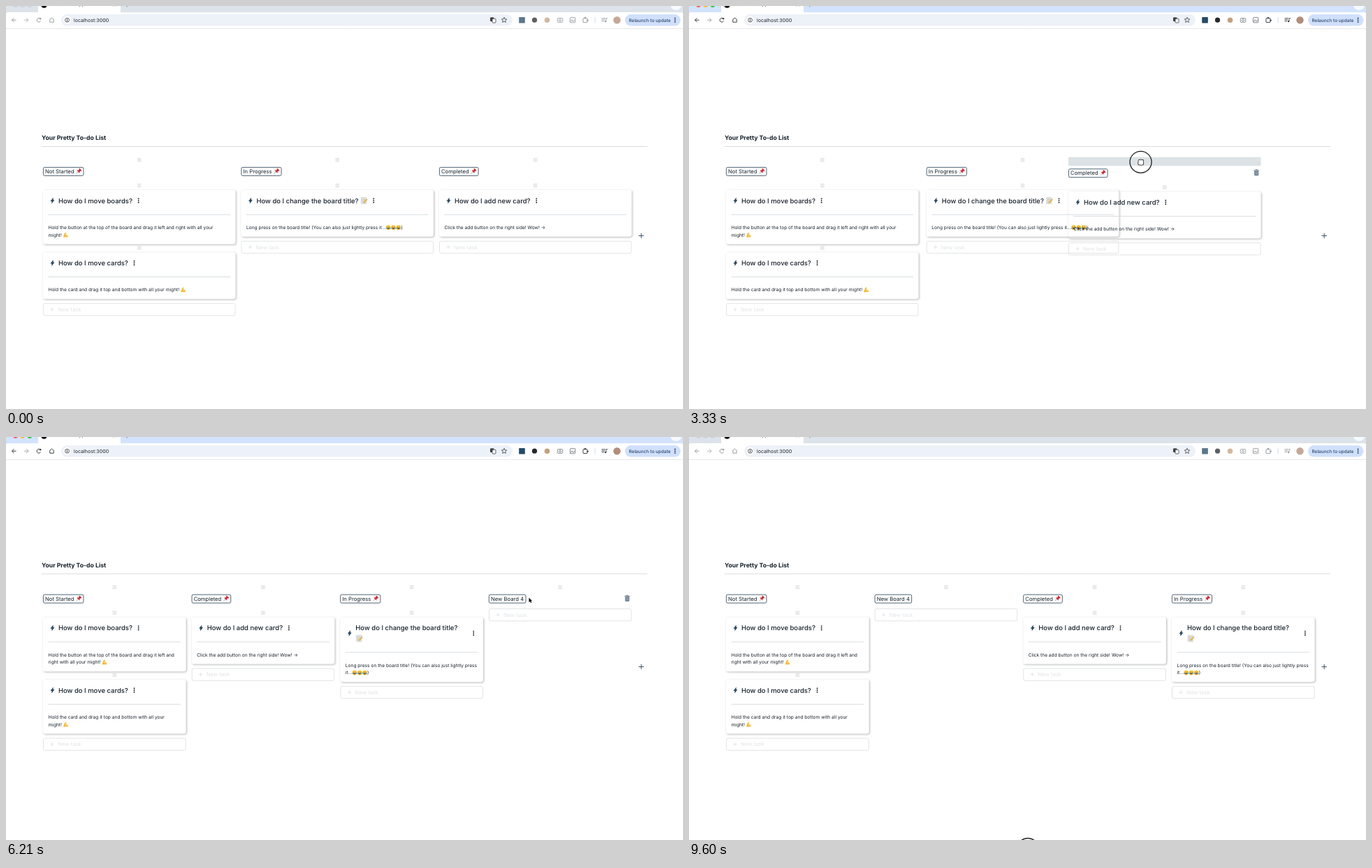
Write an HTML page with a canvas that moves like this. It is 969 px wide and 578 px high and loops after 9630 ms.

```html
<!DOCTYPE html>
<html lang="en">
<head>
<meta charset="utf-8">
<title>To-do boards</title>
<style>
html, body { margin: 0; width: 100%; height: 100%; overflow: hidden; background: #fff }
canvas { display: block; width: 969px; height: 578px }
</style>
</head>
<body>
<canvas id="stage" width="969" height="578"></canvas>
<script>
const g = document.getElementById('stage').getContext('2d');
g.textRendering = 'geometricPrecision';
const LOOP = 9630, INK = '#16212b', SLATE = '#5d7286', RULE = '#d8dde1', FAINT = '#e2e4e6';
const BAR = '#dce2e6', PALE = '#f0fafe';
const clamp = u => Math.min(1, Math.max(0, u));
const mix = (a, b, u) => a + (b - a) * u;
const ramp = (t, start, time) => clamp((t - start) / time);

// cubic-bezier(.4, 0, .1, 1), solved by bisection
function ease(u) {
  let lo = 0, hi = 1;
  for (let i = 0; i < 16; i++) {
    const s = (lo + hi) / 2, r = 1 - s;
    if (1.2 * s * r * r + .3 * s * s * r + s ** 3 < u) lo = s; else hi = s;
  }
  return u >= 1 ? 1 : 3 * lo * lo - 2 * lo ** 3;
}
const glide = (t, start, time = 450) => ease(ramp(t, start, time));

// drawing helpers
function at(x, y, draw, sx = 1, sy = sx) {
  g.save(); g.translate(x, y); g.scale(sx, sy); draw(); g.restore();
}
function paint(fill, stroke, width = 1) {
  if (fill) { g.fillStyle = fill; g.fill(); }
  if (stroke) { g.strokeStyle = stroke; g.lineWidth = width; g.stroke(); }
}
function box(x, y, w, h, r, ...style) {
  g.beginPath(); g.roundRect(x, y, w, h, r); paint(...style);
}
function disc(x, y, r, ...style) {
  g.beginPath(); g.arc(x, y, r, 0, 7); paint(...style);
}
function trace(points, ...style) {
  g.beginPath();
  for (let i = 0; i < points.length; i += 2) g.lineTo(points[i], points[i + 1]);
  paint(...style);
}
const line = (color, width, ...points) => trace(points, null, color, width);
const cross = (x, y, r, color, width = 1) => {
  line(color, width, x - r, y, x + r, y);
  line(color, width, x, y - r, x, y + r);
};
const trio = draw => [-1, 0, 1].forEach(draw);
const dots = (x, y, color) => trio(i => disc(x, y + 2.7 * i, .95, color));
const grip = (x, y) => trio(i => line('#d0d3d6', .9, x - 2.8, y + 2 * i, x + 2.8, y + 2 * i));

// emoji on a unit square around the origin
const emoji = {
  '📌'() {
    g.rotate(.8);
    line('#8b9298', .1, 0, 0, 0, .58);
    box(-.17, -.5, .34, .5, 0, '#b9232e');
    for (const y of [-.5, -.05]) box(-.3, y, .6, .17, .06, '#d8333d');
  },
  '💪'() {
    line('#f4b52f', .28, -.08, -.3, -.3, .3, .46, .3);
    disc(.14, .16, .23, '#f8c54a');
    disc(-.04, -.32, .18, '#f8c54a');
  },
  '📝'() {
    box(-.42, -.45, .78, .92, .05, '#e2e3df', '#bfc2c2', .04);
    trio(i => line('#a9b0b4', .05, -.3, .2 * i, .2, .2 * i));
    line('#e9b036', .17, -.06, .35, .46, -.22);
  },
  '😂'() {
    disc(0, 0, .48, '#fac53a');
    g.beginPath(); g.arc(0, .05, .28, 0, Math.PI); paint('#7a4a1c');
    for (const side of [-1, 1]) {
      line('#7a4a1c', .08, side * .3, -.12, side * .1, -.12);
      disc(side * .38, .14, .14, '#58b5ea');
    }
  }
};
const EMOJI = /(📌|💪|📝|😂)/u;
const EMOJI_WIDTH = 1.1;

function measure(str, size, weight) {
  g.font = `${weight} ${size}px Inter, sans-serif`;
  return str.split(EMOJI).reduce((w, part) =>
    w + (emoji[part] ? size * EMOJI_WIDTH : g.measureText(part).width), 0);
}
// draws text with emoji, vertically centred on y; returns the end x
function text(str, x, y, size, weight = 400, color = INK) {
  for (const part of str.split(EMOJI)) {
    const w = measure(part, size, weight);
    if (emoji[part]) at(x + w / 2, y, emoji[part], size * 1.05);
    g.fillStyle = color;
    if (!emoji[part]) g.fillText(part, x, y + size * .36);
    x += w;
  }
  return x;
}
function wrap(str, max, size, weight) {
  const lines = [''];
  for (const word of str.split(/ (?!💪)/u)) {
    const last = lines.length - 1, longer = (lines[last] + ' ' + word).trim();
    if (measure(longer, size, weight) > max) lines.push(word); else lines[last] = longer;
  }
  return lines;
}

// content
const boards = {
  todo: { label: 'Not Started 📌', cards: [
    ['How do I move boards?', 'Hold the button at the top of the board and drag it left and right with all your might! 💪'],
    ['How do I move cards?', 'Hold the card and drag it top and bottom with all your might! 💪']] },
  doing: { label: 'In Progress 📌', cards: [
    ['How do I change the board title? 📝', 'Long press on the board title! (You can also just lightly press it...😂😂😂)']] },
  done: { label: 'Completed 📌', cards: [
    ['How do I add new card?', 'Click the add button on the right side! Wow! →']] },
  fresh: { label: 'New Board 4', cards: [] }
};
const TITLE = 9.48, BODY = 6.62, LABEL = 7.7, CARD_TOP = 49.3, CARD_GAP = 11.7;

// layout for n columns
const step = n => n === 3 ? 283.5 : 212.65;
const width = n => step(n) - 8;
const colX = (slot, n) => 53 + slot * step(n);
const topY = n => n === 3 ? 214.5 : 209.2;
function cardLayout([heading, body], n) {
  const title = wrap(heading, width(n) - 48, TITLE, 500);
  const lines = wrap(body, width(n) - 13, BODY, 400);
  const extra = 15 * (title.length - 1);
  return { title, lines, extra, h: 67 + extra + 10.7 * (lines.length - 1) };
}
const boardSize = (b, n) => b.cards.length
  ? b.cards.reduce((y, c) => y + cardLayout(c, n).h + CARD_GAP, CARD_TOP + 12.3) : 55.1;

function drawCard({ title, lines, extra, h }, w) {
  g.save();
  g.beginPath(); g.rect(-20, -20, w + 40, h + 40); g.roundRect(0, 0, w, h, 3); g.clip('evenodd');
  g.shadowColor = 'rgba(0,0,0,.3)'; g.shadowBlur = 3; g.shadowOffsetX = g.shadowOffsetY = 1;
  box(0, 0, w, h, 3, '#fff');
  g.restore();
  at(13.5, 15.3 + extra / 2, () => {
    for (const turn of [1, -1]) trace([turn, -4 * turn, -2.7 * turn, .8 * turn, turn, .8 * turn], '#27475e');
  }, 1.1);
  let end;
  title.forEach((s, i) => end = text(s, 22, 15.3 + 15 * i, TITLE, 500));
  dots(extra ? w - 13.7 : end + 8.7, 15.3 + extra / 2, INK);
  line(RULE, 1, 7.5, 35.4 + extra, w - 7.5, 35.4 + extra);
  lines.forEach((s, i) => text(s, 7.5, 53.9 + extra + 10.7 * i, BODY));
}
function drawTrash() {
  box(-3, -2, 6, 6.5, 1, SLATE);
  trio(i => line('#dfe5ea', .5, 1.4 * i, -1, 1.4 * i, 3.4));
  line(SLATE, 1, -4, -2.9, 4, -2.9);
  line(SLATE, 1, -1.5, -4, 1.5, -4);
}
function drawBoard(b, n, { bar, alpha = 0, trash }) {
  const w = width(n);
  g.globalAlpha = alpha;
  box(0, 0, w, 12.3, 1, bar || BAR);
  g.globalAlpha = 1;
  if (!alpha || bar === PALE) grip(w / 2, 6.2);
  const end = text(b.label, 3, 22.7, LABEL);
  box(.4, 16.9, end + 2.4, 12, 2, null, '#3d5568', .9);
  if (trash) at(w - 6.4, 22, drawTrash);
  let y = CARD_TOP;
  for (const c of b.cards) {
    const card = cardLayout(c, n);
    grip(w / 2, y - 6.3);
    at(0, y, () => drawCard(card, w));
    y += card.h + CARD_GAP;
  }
  y = b.cards.length ? y - 5.7 : 36.8;
  box(.5, y + .5, w - 1, 17.3, 2, null, FAINT);
  cross(13, y + 9, 2.5, FAINT);
  text('New task', 21, y + 9, LABEL, 400, FAINT);
}

// pointer travels: start, end, x, y and a sideways swing on the way
const moves = [
  [420, 600, 692, 256], [810, 1740, 703, 236, -24], [2100, 2520, 723.5, 221.5],
  [3120, 3840, 461, 229.5], [4170, 5190, 896.5, 332, -300], [5190, 5250, 909, 329.5],
  [5940, 6210, 748.5, 230.5], [6300, 6840, 800, 218], [6960, 7350, 347, 269.5],
  [7350, 7440, 324, 278], [7920, 8100, 465, 396], [8250, 8760, 640, 260], [8910, 9060, 485, 591]];
const pointer = t => moves.reduce(([px, py], [a, b, x, y, swing = 0]) => {
  const u = ramp(t, a, b - a);
  return [mix(px, x, u) + swing * Math.sin(Math.PI * u), mix(py, y, u)];
}, [484, 591]);
const presses = [[1830, 1920], [2940, 3840], [5280, 5380], [6930, 7330], [9570, LOOP]];
const ADD = 5310;

// follows the pointer from the home column, then settles in the landing column
function dragged(t, start, drop, time, from, to) {
  if (t < start) return [from, 0];
  const a = pointer(start), p = pointer(Math.min(t, drop)), back = glide(t, drop, time);
  return [mix(from + p[0] - a[0], to, back), mix(p[1] - a[1], 0, back)];
}

function drawBoards(t) {
  const n = t < ADD ? 3 : 4, k = glide(t, ADD, 400);
  const within = (a, b) => t >= a && t < b;
  const slotX = slot => mix(colX(slot, 3), colX(slot, 4), k);
  const y = mix(topY(3), topY(4), k);
  const put = (b, x, opts = {}, dy = 0) => {
    const sx = mix(width(3), width(4), k) / width(n);
    const sy = mix(boardSize(b, 3), boardSize(b, 4), k) / boardSize(b, n);
    at(x, y + dy, () => drawBoard(b, n, opts), sx, sy);
  };
  const swap = glide(t, 7020, 300);

  put(boards.todo, slotX(0));
  put(boards.doing, slotX(1 + glide(t, 3300) + swap), { trash: within(4720, 5250) });

  const [doneX, doneY] = n === 4 ? [slotX(1 + swap), 0]
    : dragged(t, 3120, 3840, 100, colX(2, 3), colX(1, 3));
  put(boards.done, doneX, {
    alpha: ramp(t, 2300, 200) * (1 - ramp(t, 3840, 100)),
    trash: within(2100, 4680) || within(8600, 8940)
  }, doneY);

  if (n === 4) {
    const [x, dy] = dragged(t, 6960, 7440, 210, colX(3, 4), colX(1, 4));
    // swapping columns leaves the board as tall as its neighbour, then it shrinks
    const size = boardSize(boards.fresh, 4), tall = boardSize(boards.todo, 4) / size;
    const sy = t < 7200 ? 1 : mix(tall, 1, glide(t, 7205));
    at(x, topY(4) + dy - (sy - 1) * size / 2, () => drawBoard(boards.fresh, 4, {
      bar: t < 7300 ? BAR : PALE,
      alpha: ramp(t, 6600, 150) * (1 - ramp(t, 7450, 150)),
      trash: within(6030, 7500)
    }), 1, sy);
  }
}

function drawBrowser(active) {
  const dark = active ? '#3c4043' : '#9a9da1', soft = active ? '#a3a6aa' : '#b5b8bb';
  const mid = 20.2;
  box(0, 0, 969, 10, 0, active ? '#d3e3fd' : '#dde3ea');
  box(46, -8, 118, 20, 4, '#fff');
  ['#fe5f57', '#febc2e', '#28c840'].forEach((c, i) =>
    disc(13.5 + 10.2 * i, -1.5, 3.4, active ? c : '#cfd4da'));
  disc(54.5, -1.2, 4, '#000');
  text('Create Next App', 62.5, -2, 6.4, 400, '#33363a');
  at(155.5, -1.5, () => { g.rotate(Math.PI / 4); cross(0, 0, 2.8, '#777', .8); });
  cross(173, -1.5, 2.8, '#555', .8);
  disc(959, -2, 8, '#f7faff');
  box(0, 9, 969, 23, [3, 3, 0, 0], '#fff');
  line('#e6e8eb', 1, 0, 32.5, 969, 32.5);

  // navigation
  const arrow = (x, color, way) => at(x, mid, () => {
    line(color, 1, -3, 0, 3, 0);
    line(color, 1, 0, -3, 3, 0, 0, 3);
  }, way, 1);
  arrow(11.5, dark, -1);
  arrow(29, soft, 1);
  g.beginPath(); g.arc(47, mid, 2.9, .5, 5.6); paint(null, dark);
  box(48, 17, 2.3, 2.3, 0, dark);
  at(65.5, mid, () => line(dark, 1, 0, -3.2, -2.7, -1, -2.7, 3, 2.7, 3, 2.7, -1, 0, -3.2));

  // address
  box(79, 12, 646, 16.6, 8.3, '#edf1f8');
  disc(87.5, mid, 5.5, '#fff');
  disc(87.5, mid, 2.9, null, '#3c4043', .9);
  line('#3c4043', .9, 87.5, 18.5, 87.5, 22);
  text('localhost:3000', 97, mid, 7.1, 400, '#1f2328');
  box(693, 16.2, 5.4, 5.8, 1, '#3c4043');
  box(696, 18.2, 5, 5.8, 1, '#fff', '#3c4043', .8);
  const star = Array.from({ length: 11 }, (_, i) => {
    const r = i % 2 ? 1.8 : 4, a = i * Math.PI / 5 - Math.PI / 2;
    return [713 + r * Math.cos(a), mid + r * Math.sin(a)];
  });
  line('#3c4043', .8, ...star.flat());

  // extensions
  g.globalAlpha = active ? 1 : .75;
  box(734.2, 15.9, 8.6, 8.6, .5, '#234a66');
  disc(756.5, mid, 3.6, '#25292d');
  disc(774.5, mid, 3.8, '#c3a07c');
  box(789.3, 17.5, 7.4, 5.8, 1, null, '#6b6f74', .8);
  disc(793, 20.4, 1.5, null, '#6b6f74', .8);
  box(807.4, 16.4, 7.4, 7.4, 1, '#f1f2f3', '#6b6f74', .8);
  line('#6b6f74', .8, 808, 22.6, 810, 20, 812, 22, 814, 20.5);
  g.globalAlpha = 1;
  box(826, 17.6, 6, 6, .6, null, dark);
  disc(829, 17, 1.2, dark); disc(832.6, 20.6, 1.2, dark);
  line('#d2dcec', 1, 843, 16, 843, 24.5);
  trio(i => line(dark, .9, 852.5, 19.7 + 2 * i, 857 - i, 19.7 + 2 * i));
  line(dark, .9, 859, 22, 859, 17.6, 861, 17.6);
  disc(858, 22, 1.2, dark);
  disc(874.5, mid, 5.2, active ? '#b18e7c' : '#c4a897');
  box(886, 12, 79.5, 16.6, 8.3, '#d0e0fc');
  text('Relaunch to update', 891.5, mid, 6.5, 500, '#2b4468');
  dots(957.6, mid, '#1d3557');
}

function drawPointer(t) {
  const [x, y] = pointer(t);
  for (const [down, up] of presses) {
    const r = 15.5 * (1 - ramp(t, up, 100));
    if (t >= down && r > 0) disc(x, y, r, null, '#1c1f22', 1.3);
  }
  const hand = t >= 2490 && t < 3870 || t >= 6700 && t < 7330;
  at(x, y, () => {
    g.beginPath();
    if (hand) {
      for (let i = 0; i < 4; i++) g.roundRect(-3 + 1.7 * i, -3.6 + Math.abs(i - 1.3) * .4, 1.6, 4, .8);
      g.roundRect(-3.4, -1, 7.1, 4.8, 1.8);
      paint(null, '#222', 1.6);
      paint('#fff');
    } else {
      trace([0, 0, 0, 6.6, 1.6, 5.2, 2.7, 7.6, 3.8, 7.1, 2.7, 4.8, 4.7, 4.7, 0, 0], null, '#fff', 1.2);
      paint('#000');
    }
  });
}

function draw(t) {
  box(0, 0, 969, 578, 0, '#fff');
  drawBrowser(t >= 1860 && t < 9570);
  const top = topY(t < ADD ? 3 : 4);
  text('Your Pretty To-do List', 51, top - 25.3, 8.7, 700);
  line(RULE, 1, 51, top - 13, 918, top - 13);
  cross(909.2, 329.5, 3.7, '#3f5162');
  drawBoards(t);
  drawPointer(t);
}

const start = performance.now();
(function tick() {
  draw((performance.now() - start) % LOOP);
  requestAnimationFrame(tick);
})();
</script>
</body>
</html>
```
